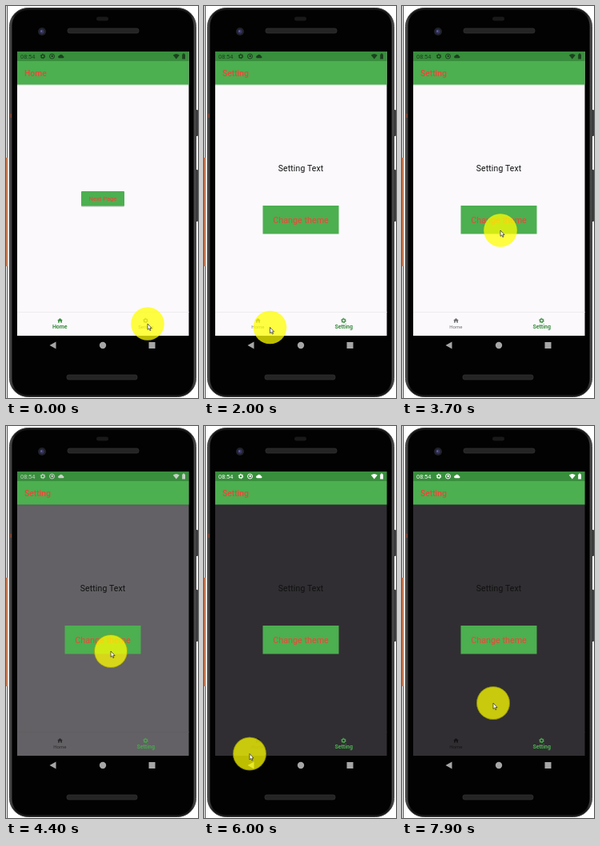
An HTML page that plays this animation: 240x491 px, repeating every 8000 ms.

```html
<!DOCTYPE html>
<html lang="en">
<head>
<meta charset="utf-8">
<title>Theme switch on a phone</title>
<style>
  html, body { margin: 0; width: 100%; height: 100%; overflow: hidden; background: #fff; }
  svg { display: block; width: 100vw; height: 100vh; }
  text { font-family: Roboto, "Open Sans", sans-serif; }
  .screen { fill: var(--bg); }
  .line { fill: var(--line); }
  .status { fill: var(--status); stroke: none; }
  .title { font-size: 10.3px; font-weight: 500; fill: #f44336; }
  .red { fill: #f44336; text-anchor: middle; }
  .body { font-size: 10.4px; letter-spacing: .15px; fill: #101010; text-anchor: middle; }
  .tab { color: var(--idle); }
  .tab text { font-size: 6px; fill: currentColor; text-anchor: middle; }
  .tab.on { color: var(--active); }
  .tab.on text { font-size: 7px; font-weight: 700; }
  .hide { display: none; }
</style>
</head>
<body>
<svg id="stage" viewBox="0 0 240 491" preserveAspectRatio="none">
  <defs>
    <g id="gear" fill="none" stroke="currentColor">
      <circle r="1.9" stroke-width="1.3"/>
      <circle r="2.8" stroke-width="1" stroke-dasharray="1.5 1.43"/>
    </g>
    <path id="house" d="M0-3 3.4 0H2.4V2.8H.8V.7H-.8V2.8H-2.4V0H-3.4Z" fill="currentColor"/>
    <linearGradient id="rim">
      <stop offset="0" stop-color="#555"/>
      <stop offset=".03" stop-color="#151515"/>
      <stop offset=".97" stop-color="#151515"/>
      <stop offset="1" stop-color="#555"/>
    </linearGradient>
  </defs>

  <!-- desk and phone -->
  <rect width="240" height="491" fill="#fff"/>
  <rect x="1" width="1" height="491" fill="#4a4a4a"/>
  <rect y="190" width="1.5" height="136" fill="#d98258"/>
  <rect x="236" y="130" width="4" height="33" rx="1" fill="#3b3b3d"/>
  <rect x="236" y="205" width="4" height="65" rx="1" fill="#3b3b3d"/>
  <rect x="4.5" y="2.5" width="233" height="487" rx="23" fill="url(#rim)" stroke="#3c3c3e"/>
  <rect x="7.5" y="5" width="227" height="482" rx="20" fill="#020202"/>
  <rect x="5" y="135" width="2" height="5" fill="#7c4a3c"/>
  <rect x="113" y="13.5" width="15" height="5" rx="2.5" fill="#191919"/>
  <g fill="#242424" stroke="#363636" stroke-width=".7">
    <rect x="77" y="28" width="89" height="6" rx="2.5"/>
    <rect x="76" y="462" width="88" height="6" rx="2.5"/>
  </g>
  <circle cx="45" cy="32" r="5" fill="#20202a"/>
  <circle cx="45" cy="32" r="2.7" fill="#34345e"/>
  <circle cx="44.3" cy="31.6" r="1" fill="#7070b0"/>

  <!-- app -->
  <rect class="screen" x="14" y="57" width="214.5" height="356"/>
  <rect x="14" y="57" width="214.5" height="12" fill="#388e3c"/>
  <rect x="14" y="69" width="214.5" height="29.5" fill="#4caf50"/>
  <rect x="14" y="98.5" width="214.5" height="1" fill="#000" opacity=".1"/>
  <rect class="line" x="14" y="383" width="214.5" height="1"/>

  <g class="status">
    <text x="18" y="66" font-size="7.4">08:54</text>
    <g style="color:var(--status)"><use href="#gear" x="46" y="63"/></g>
    <circle cx="57.5" cy="63" r="3" fill="none" stroke="var(--status)"/>
    <circle cx="57.7" cy="62.8" r="1.3"/>
    <path d="M66.7 65.3a1.6 1.6 0 0 1 0-3.2 2.4 2.4 0 0 1 4.5.3 1.5 1.5 0 0 1 .3 2.9Z"/>
    <path d="M208.8 61.4Q212.8 58.4 216.8 61.4L212.8 66.4Z"/>
    <path d="M220.2 60.4h1v-.9h1.8v.9h1v6.2h-3.8Z"/>
  </g>

  <g id="homePage">
    <text class="title" x="23" y="88">Home</text>
    <rect x="94" y="233" width="54" height="18.5" rx="1" fill="#000" opacity=".22"/>
    <rect x="94" y="232" width="54" height="18.5" rx="1" fill="#4caf50"/>
    <text class="red" x="121" y="244" font-size="7.6">Next Page</text>
  </g>
  <g id="settingPage">
    <text class="title" x="23" y="88">Setting</text>
    <text class="body" x="121" y="206.5">Setting Text</text>
    <rect x="73.5" y="250" width="95" height="35.5" fill="#4caf50"/>
    <text class="red" x="121" y="271.5" font-size="10.8">Change theme</text>
  </g>

  <g id="homeTab" class="tab">
    <use href="#house" x="67.5" y="394"/>
    <text x="67.3" y="404">Home</text>
  </g>
  <g id="settingTab" class="tab">
    <use href="#gear" x="174.5" y="394"/>
    <text x="174.7" y="404">Setting</text>
  </g>

  <g fill="#a6a6a6">
    <path d="M54.5 425 62.5 420.5V429.5Z"/>
    <circle cx="121" cy="425" r="4.2"/>
    <rect x="178.5" y="421" width="8" height="8"/>
  </g>

  <g id="pointer">
    <circle r="20.8" fill="#ff0" fill-opacity=".74"/>
    <circle id="ring" r="20.5" fill="none" stroke="#757200" stroke-opacity=".6"/>
    <path d="M0 0V7.4L1.7 5.9 2.9 8.5 4 8 2.9 5.5H5.1Z" fill="#fff" stroke="#222" stroke-width=".7"/>
  </g>
</svg>
<script>
  const LOOP = 8000, TICK = 100;
  const $ = id => document.getElementById(id);

  // pointer stops: time, x, y
  const path = [
    [0, 177, 398], [100, 177, 398], [400, 177, 393], [1400, 177, 393],
    [1700, 145, 399], [2000, 82.5, 402.5], [2200, 74, 403], [2400, 74, 403],
    [2600, 175, 403], [2900, 174, 402.5], [3200, 174, 402.5], [3700, 123, 281],
    [4000, 123, 281], [4200, 131, 282], [4500, 131, 282], [4700, 60, 130],
    [4900, 22, 54], [5200, 120, 75], [5400, 207, 80], [5600, 190, 260],
    [5800, 157, 416], [5900, 105, 420], [6000, 57, 410.5], [6200, 42, 405],
    [6400, 75, 390], [6700, 100, 207], [6800, 80, 150], [7000, 50.5, 70],
    [7200, 22, 75], [7400, 120, 72], [7600, 207, 80], [7700, 150, 190],
    [7800, 67, 300], [7900, 114, 347], [8000, 114, 347]
  ];

  // light and dark colours
  const theme = {
    bg: [[251, 249, 252], [48, 46, 50]],
    line: [[238, 236, 239], [48, 46, 50]],
    status: [[29, 65, 32], [255, 255, 255]],
    idle: [[112, 112, 112], [20, 20, 20]],
    active: [[60, 142, 65], [76, 175, 80]]
  };

  const lerp = (a, b, k) => a + (b - a) * k;
  const clamp = k => Math.max(0, Math.min(1, k));

  function pointerAt(t) {
    const i = path.findIndex((p, n) => n && t < p[0]);
    const [t0, x0, y0] = path[i - 1], [t1, x1, y1] = path[i];
    const k = (t - t0) / (t1 - t0);
    return [lerp(x0, x1, k), lerp(y0, y1, k)];
  }

  function draw(t) {
    const onHome = t < 800 || (t >= 2400 && t < 2900);
    const homeActive = t < 900 || (t >= 2400 && t < 3000);
    $('homePage').classList.toggle('hide', !onHome);
    $('settingPage').classList.toggle('hide', onHome);
    $('homeTab').classList.toggle('on', homeActive);
    $('settingTab').classList.toggle('on', !homeActive);

    const dark = clamp((t - 4250) / 200);
    for (const [name, [a, b]] of Object.entries(theme)) {
      const rgb = a.map((v, i) => Math.round(lerp(v, b[i], dark)));
      $('stage').style.setProperty('--' + name, `rgb(${rgb})`);
    }
    $('ring').style.opacity = dark;
    $('pointer').setAttribute('transform', `translate(${pointerAt(t)})`);
  }

  function frame() {
    draw(Math.floor(performance.now() % LOOP / TICK) * TICK);
    requestAnimationFrame(frame);
  }
  frame();
</script>
</body>
</html>
```
